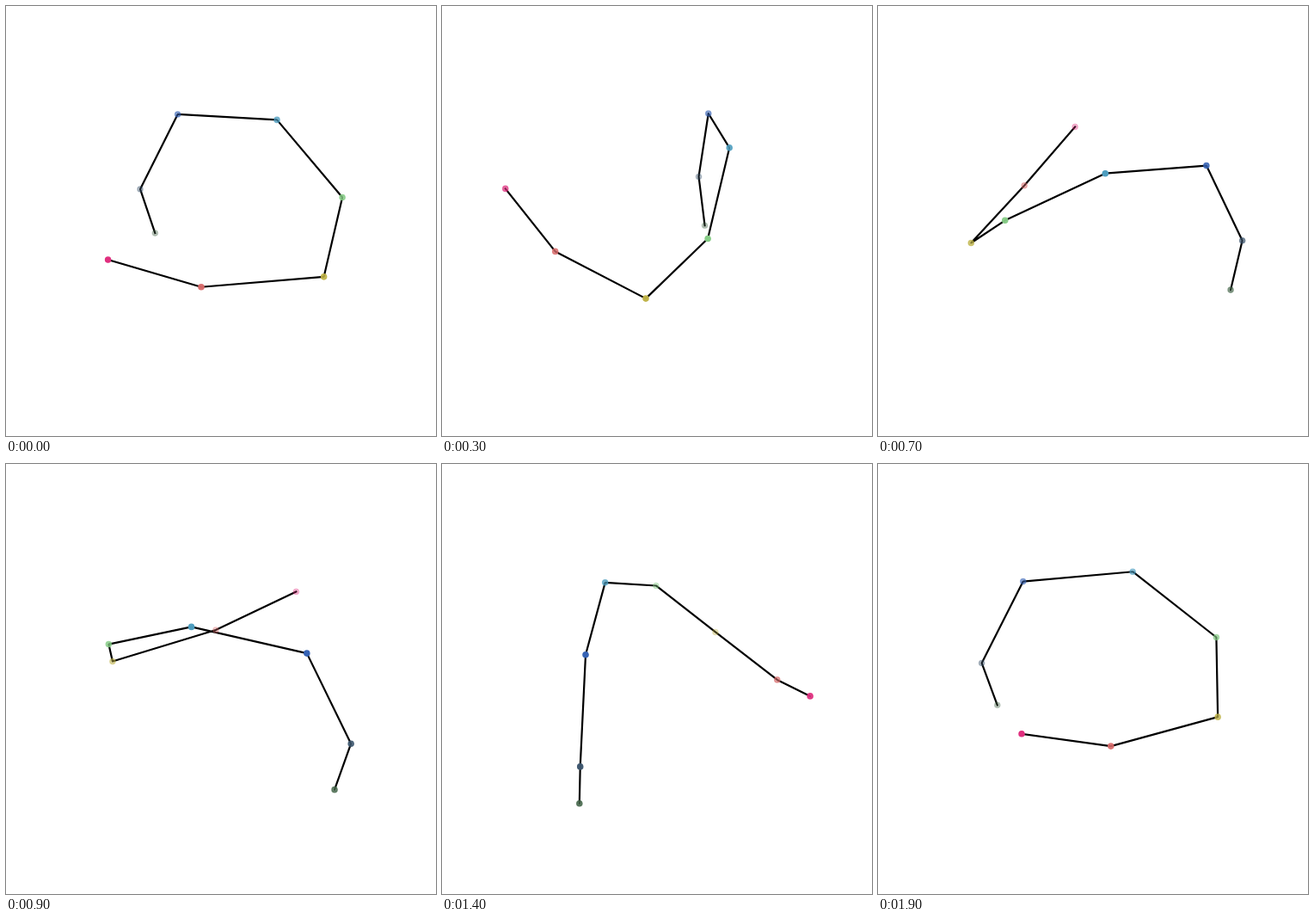
Recreate the animation shown at these times as an HTML page with a canvas. Size 500 by 500 pixels, loop 2 s.

```html
<!DOCTYPE html>
<html lang="en">
<head>
<meta charset="utf-8">
<title>Rotating chain</title>
<style>
  html, body { margin: 0; width: 100%; height: 100%; overflow: hidden; background: #fff; }
  canvas { display: block; width: 100vw; height: 100vh; }
</style>
</head>
<body>
<canvas id="stage" width="500" height="500"></canvas>
<script>
const ctx = document.getElementById('stage').getContext('2d');

const STEPS = 20, STEP_MS = 100;
const CENTER = { x: 256.76, y: 243.24 };
const CAMERA = 2703;                 // camera distance, in pixels at the centre
const SIN_ELEV = 0.5, COS_ELEV = Math.sqrt(0.75);
const MIN_ALPHA = 0.3;

// right, toward the viewer, up, colour
const NODES = [
  [-131.8, 131.8,  19.0, '#e0307f'],
  [ -28.6, 131.6, -16.7, '#d96b6b'],
  [ 109.6, 103.0, -20.8, '#bfb347'],
  [ 131.8,  34.2,  43.2, '#86cc86'],
  [  58.2, -51.2,  98.2, '#4d9dbf'],
  [ -58.3, -109.3, 75.2, '#3663b5'],
  [-105.7, -131.5, -39.2, '#3d566e'],
  [ -88.4, -128.5, -99.7, '#44664a']
];

function project([a, b, up, color], angle) {
  const c = Math.cos(angle), s = Math.sin(angle);
  const side = a * c - b * s;
  const front = a * s + b * c;
  const scale = CAMERA / (CAMERA - COS_ELEV * front - SIN_ELEV * up);
  return {
    x: CENTER.x + side * scale,
    y: CENTER.y - (COS_ELEV * up - SIN_ELEV * front) * scale,
    scale, color
  };
}

function drawChain(points) {
  ctx.strokeStyle = '#000';
  ctx.lineWidth = 2.2;
  ctx.lineJoin = 'round';
  ctx.lineCap = 'square';
  ctx.beginPath();
  points.forEach(p => ctx.lineTo(p.x, p.y));
  ctx.stroke();
}

// Nearer markers are more opaque and cover the farther ones.
function drawMarkers(points) {
  const sorted = [...points].sort((p, q) => p.scale - q.scale);
  const far = sorted[0].scale, near = sorted[sorted.length - 1].scale;
  ctx.lineWidth = 1.39;
  for (const p of sorted) {
    ctx.globalAlpha = MIN_ALPHA + (1 - MIN_ALPHA) * (p.scale - far) / (near - far);
    ctx.fillStyle = ctx.strokeStyle = p.color;
    ctx.beginPath();
    ctx.arc(p.x, p.y, 3.1, 0, 2 * Math.PI);
    ctx.fill();
    ctx.stroke();
  }
  ctx.globalAlpha = 1;
}

function draw(step) {
  const angle = 2 * Math.PI * step / STEPS;
  const points = NODES.map(node => project(node, angle));
  ctx.fillStyle = '#fff';
  ctx.fillRect(0, 0, 500, 500);
  drawChain(points);
  drawMarkers(points);
}

let start;
function tick(now) {
  start ??= now;
  draw(Math.floor((now - start) / STEP_MS) % STEPS);
  requestAnimationFrame(tick);
}
draw(0);
requestAnimationFrame(tick);
</script>
</body>
</html>
```
